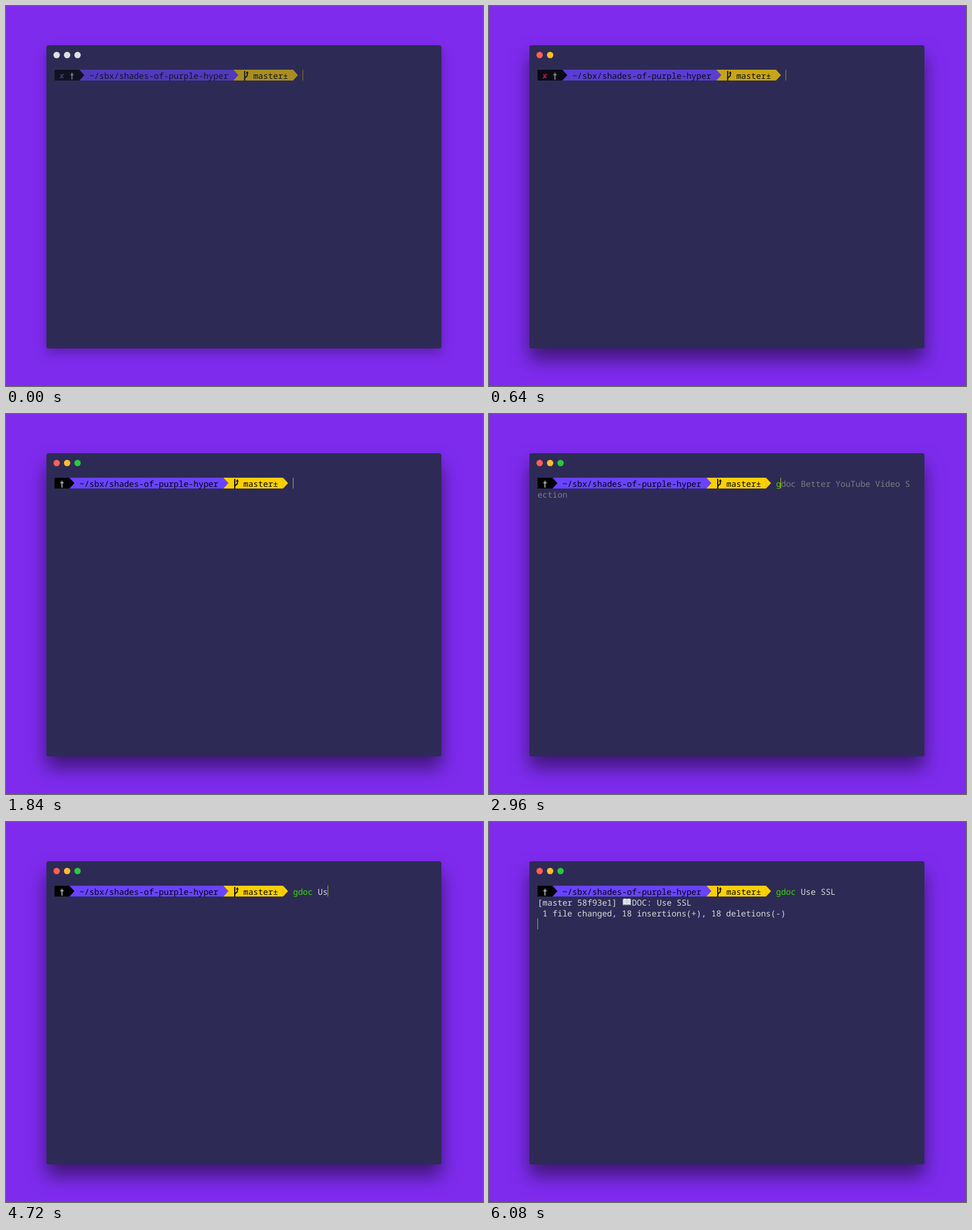
Recreate the animation shown at these times as an HTML page. Size 838 by 668 pixels, loop 8000 ms.

```html
<!DOCTYPE html>
<html lang="en">
<head>
<meta charset="utf-8">
<title>Terminal</title>
<style>
  html, body { margin: 0; width: 100%; height: 100%; overflow: hidden; background: #7e2bee; }
  #window {
    position: absolute; left: 71px; top: 69px; width: 694px; height: 532.5px;
    border-radius: 4px; background: #2d2b55;
    box-shadow: 0 20px 32px rgba(0, 0, 0, .5);
  }
  #window.idle { box-shadow: 0 8px 19px rgba(0, 0, 0, .28); }
  svg { position: absolute; left: 0; top: 0; display: block; }
  text {
    font: 14.545px "Noto Sans Mono", "DejaVu Sans Mono", monospace;
    text-rendering: geometricPrecision; white-space: pre;
  }
  text.bold { font-weight: 700; }
  text.symbol { font-family: "DejaVu Sans Mono", "DejaVu Sans", monospace; }
</style>
</head>
<body>
<div id="window"></div>
<svg width="838" height="668" viewBox="0 0 838 668">
  <g id="buttons"></g>
  <g id="screen"></g>
</svg>
<script>
const LOOP = 8000, COLUMNS = 75;
const LEFT = 85.3, TOP = 112, CELL = 8.727, LINE = 19.2, BAR = 19;
const GREEN = '#3ad900', RED = '#ff0000', GRAY = '#7c7b82', WHITE = '#dadada';
const PURPLE = '#6943ff', GOLD = '#fad000';
const LIGHTS = ['#ff5f57', '#ffbd2e', '#28c93f'];
const HINT = 'gdoc Better YouTube Video Section';

const $ = id => document.getElementById(id);
const colX = col => LEFT + col * CELL;
const rowY = row => TOP + row * LINE;

function text(col, row, str, fill, cls = '') {
  return `<text class="${cls}" x="${colX(col)}" y="${rowY(row) + 15.8}" fill="${fill}">${str}</text>`;
}

// Text that continues on the next row at the right edge.
function wrapped(col, str, fill) {
  const room = COLUMNS - col;
  return text(col, 0, str.slice(0, room), fill) + text(0, 1, str.slice(room), fill);
}

function bar(from, to, fill) {
  return `<rect x="${colX(from)}" y="${TOP}" width="${(to - from) * CELL}" height="${BAR}" fill="${fill}"/>`;
}

function arrow(col, fill) {
  return `<path d="M${colX(col) - .3} ${TOP}h.3l${CELL} ${BAR / 2}l${-CELL} ${BAR / 2}h-.3z" fill="${fill}"/>`;
}

function branch(col) {
  return `<g transform="translate(${colX(col)} ${TOP})" fill="none" stroke="#000" stroke-width="1.9">
    <path d="M2.4 2V19M7 5V9.5Q7 11.5 5 12.3Q2.6 13.3 2.4 16"/>
    <path d="M4.4 6.4L7 2.6L9.4 6.4z" fill="#000" stroke="none"/></g>`;
}

function book(col, row) {
  return `<g transform="translate(${colX(col) + 1} ${rowY(row) + 3.6})">
    <path d="M0 1.5L1.5 0H13.5L15 1.5V11.5H0z" fill="#8796a8"/>
    <path d="M1.3 .6Q5 -.8 7.1 1V10.5Q5 9 1.3 10zM13.7 .6Q10 -.8 7.9 1V10.5Q10 9 13.7 10z" fill="#f0f2f4"/>
    <path d="M2.6 3H6M2.6 5H6M2.6 7H6M9 3H12.4M9 5H12.4M9 7H12.4" stroke="#b3bbc4" stroke-width=".8"/></g>`;
}

function caret(col, row) {
  return `<rect x="${Math.floor(colX(col))}" y="${rowY(row)}" width="1" height="${BAR}" fill="${GOLD}" opacity=".8"/>`;
}

// A failed last command adds a cross, which moves everything two cells right.
function prompt(cross) {
  const shift = cross ? 2 : 0;
  const path = 3 + shift, git = 34 + shift, end = 46 + shift;
  return bar(0, path, '#000') + bar(path, git, PURPLE) + bar(git, end, GOLD) +
    arrow(path, '#000') + arrow(git, PURPLE) + arrow(end, GOLD) +
    (cross ? text(1, 0, '✘', cross, 'symbol bold') : '') +
    text(1 + shift, 0, '†', '#f4f4f4', 'symbol') +
    text(path + 2, 0, '~/sbx/shades-of-purple-hyper', '#000') +
    branch(git + 2) + text(git + 4, 0, 'master±', '#000');
}

function command(start, typed, hint, valid) {
  const [name] = typed.split(' ');
  const end = start + typed.length;
  return text(start, 0, name, valid ? GREEN : RED, valid ? '' : 'bold') +
    text(start + name.length, 0, typed.slice(name.length), WHITE) +
    wrapped(end, hint.slice(typed.length), GRAY);
}

const failed = (cross, typed = '', hint = '', valid = true) =>
  prompt(cross) + command(50, typed, hint, valid) + caret(50 + typed.length, 0);

const ready = (typed = '', hint = '', valid = true) =>
  prompt() + command(48, typed, hint, valid) + caret(48 + typed.length, 0);

const entered = () => prompt() + command(48, 'gdoc Use SSL', '', true);

const output = () =>
  text(0, 1, '[master 58f93e1]', WHITE) + book(17, 1) + text(19, 1, 'DOC: Use SSL', WHITE) +
  text(1, 2, '1 file changed, 18 insertions(+), 18 deletions(-)', WHITE);

const CROSS = '#b5123c', DULL = '#353156';
const steps = [
  [0, () => failed('#41406a')],
  [640, () => failed('#d8103a')],
  [720, () => failed(CROSS)],
  [1040, () => failed(DULL, 'c', 'cl', false)],
  [1200, () => failed(DULL, 'cl')],
  [1280, () => failed(DULL, 'cle', 'clear', false)],
  [1440, () => failed(DULL, 'clea', 'clear', false)],
  [1520, () => failed(DULL, 'clear')],
  [1760, () => caret(0, 0)],
  [1840, () => ready()],
  [2960, () => ready('g', HINT)],
  [3200, () => ready('gd', HINT)],
  [3280, () => ready('gdo', HINT, false)],
  [3840, () => ready('gdoc', HINT)],
  [4320, () => ready('gdoc ', HINT)],
  [4560, () => ready('gdoc U')],
  [4720, () => ready('gdoc Us')],
  [4880, () => ready('gdoc Use')],
  [5120, () => ready('gdoc Use ')],
  [5360, () => ready('gdoc Use S')],
  [5520, () => ready('gdoc Use SS')],
  [5680, () => ready('gdoc Use SSL')],
  [6000, () => entered() + caret(0, 1)],
  [6080, () => entered() + output() + caret(0, 3)]
];

function buttons(time) {
  const lit = time < 640 ? Array(3).fill('#e0e0e0') : time < 720 ? LIGHTS.slice(0, 2) : LIGHTS;
  return lit.map((fill, i) => `<circle cx="${89 + i * 18.35}" cy="86.2" r="5.6" fill="${fill}"/>`).join('');
}

let shown = null;
function draw(time) {
  const step = steps.findLast(([at]) => at <= time);
  if (step === shown) return;
  shown = step;
  const [at, content] = step;
  $('window').className = at < 640 ? 'idle' : '';
  $('buttons').innerHTML = buttons(at);
  $('screen').innerHTML = content();
  $('screen').setAttribute('opacity', at < 640 ? .6 : at < 720 ? .75 : 1);
}

const start = performance.now();
function tick() {
  draw((performance.now() - start) % LOOP);
  requestAnimationFrame(tick);
}
tick();
</script>
</body>
</html>
```
